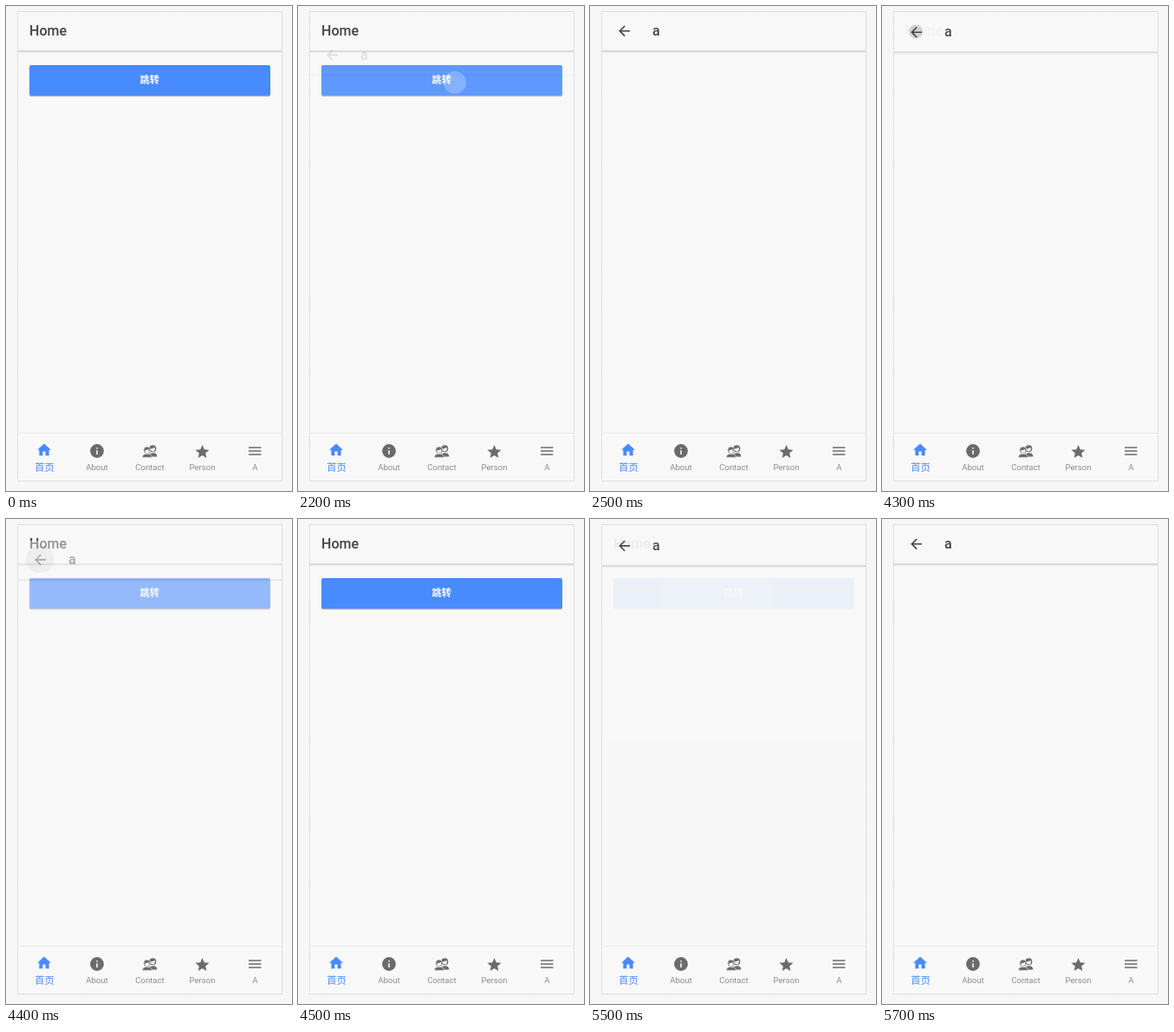
An HTML page that plays this animation: 330 by 558 pixels, repeating every 6500 ms.

```html
<!DOCTYPE html>
<html lang="en">
<head>
<meta charset="utf-8">
<title>Page transition</title>
<style>
  html, body { margin: 0; width: 100%; height: 100%; overflow: hidden; background: #f6f6f6; }
  svg { display: block; width: 330px; height: 558px; font-family: Roboto, "Noto Sans CJK SC", "Noto Sans CJK", sans-serif; }
  .title { font-size: 16px; font-weight: 500; fill: #424242; }
  .label { font-size: 9.6px; fill: #8c8c8c; text-anchor: middle; }
  .active { font-size: 11.2px; font-weight: 500; fill: #488aff; text-anchor: middle; }
  .caption { font-size: 11.2px; font-weight: 700; fill: #fff; text-anchor: middle; }
  .icon { fill: #6b6b6b; }
  .paper { fill: #f8f8f8; }
</style>
</head>
<body>
<svg viewBox="0 0 330 558">
  <defs>
    <clipPath id="screen"><rect x="14" y="7" width="304" height="484"/></clipPath>
    <clipPath id="buttonArea"><rect x="27" y="68" width="278" height="35" rx="2"/></clipPath>
    <g id="bar">
      <rect class="paper" x="14" y="7" width="304" height="485"/>
      <rect x="14" y="51" width="304" height="2" fill="#d9d9d9"/>
      <rect x="14" y="53" width="304" height="1" fill="#efefef"/>
    </g>
  </defs>

  <rect width="330" height="558" fill="#f6f6f6"/>
  <rect class="paper" x="13.5" y="6.5" width="305" height="540"/>

  <g clip-path="url(#screen)">
    <g id="home">
      <use href="#bar"/>
      <text class="title" x="27" y="34">Home</text>
      <g id="button">
        <rect x="27" y="69.5" width="278" height="35" rx="2" fill="#000" opacity=".14"/>
        <rect x="27" y="69" width="278" height="35" rx="2" fill="#000" opacity=".18"/>
        <rect x="27" y="68" width="278" height="35" rx="2" fill="#488aff"/>
        <text class="caption" x="165.7" y="88.6">跳转</text>
        <g clip-path="url(#buttonArea)"><circle id="tap" cy="88" fill="#fff"/></g>
      </g>
    </g>
    <g id="detail">
      <use href="#bar"/>
      <circle id="backTap" cx="39" cy="28" fill="#424242"/>
      <path transform="translate(30 19.2) scale(.8)" fill="#424242"
        d="M20 11H7.83l5.59-5.59L12 4l-8 8 8 8 1.41-1.41L7.83 13H20z"/>
      <text class="title" x="72" y="34">a</text>
    </g>
  </g>

  <!-- tab bar -->
  <rect x="14" y="491" width="304" height="1" fill="#e8e8e8"/>
  <path transform="translate(34.4 501.2) scale(.8)" fill="#488aff" d="M10 20v-6h4v6h5v-8h3L12 3 2 12h3v8z"/>
  <text class="active" x="44.5" y="535">首页</text>

  <circle class="icon" cx="105" cy="512" r="7.9"/>
  <path class="paper" d="M104.2 508h1.6v1.6h-1.6zM104.2 511.2h1.6v4.8h-1.6z"/>
  <text class="label" x="105" y="534.3">About</text>

  <g class="icon">
    <path d="M164.5 518.5c0-3 2-3.8 4-4.2h2c2 .3 3.8 1.2 3.8 4.2z"/>
    <circle cx="169.3" cy="509.2" r="4"/>
    <path class="paper" d="M166.8 509.2c2 .2 3.6-.3 4.6-1.4l.5 1.4c0 4.4-5 4.4-5.1 0z"/>
    <path stroke="#f8f8f8" stroke-width=".6" d="M157.4 519.4c0-3 2-3.8 4-4.2h3c2 .3 4 1.2 4 4.2z"/>
    <circle cx="162.8" cy="511" r="4" stroke="#f8f8f8" stroke-width=".6"/>
    <path class="paper" d="M160.2 511.2c2 .2 3.6-.3 4.6-1.4l.6 1.4c0 4.4-5.1 4.4-5.2 0z"/>
  </g>
  <text class="label" x="166" y="534.3">Contact</text>

  <path class="icon" transform="translate(216.9 503.3) scale(.8)"
    d="M12 17.27L18.18 21l-1.64-7.03L22 9.24l-7.19-.61L12 2 9.19 8.63 2 9.24l5.46 4.73L5.82 21z"/>
  <text class="label" x="226.5" y="534.3">Person</text>

  <path class="icon" transform="translate(277.6 502.4) scale(.8)" d="M3 6h18v2H3zM3 11h18v2H3zM3 16h18v2H3z"/>
  <text class="label" x="287.4" y="534.3">A</text>

  <rect x="13.5" y="6.5" width="305" height="540" fill="none" stroke="#d2d2d2" stroke-dasharray="2 1"/>
</svg>
<script>
  const LOOP = 6500, STEP = 100, TRAVEL = 32;
  const $ = id => document.getElementById(id);

  // lead: how far into the transition its first visible step lies
  const moves = [
    { at: 2200, lead: 19, span: 280, open: true, x: 181, r: 13, alpha: .24 },
    { at: 4300, lead: 40, span: 200, open: false, r: 8, alpha: .2 },
    { at: 5400, lead: 35, span: 280, open: true, x: 147, r: 20.5, alpha: .2 }
  ];

  const curve = (a, b, s) => 3 * (1 - s) ** 2 * s * a + 3 * (1 - s) * s * s * b + s ** 3;

  function bezier(x1, y1, x2, y2) {
    return x => {
      let low = 0, high = 1;
      for (let i = 0; i < 30; i++) {
        const mid = (low + high) / 2;
        if (curve(x1, x2, mid) < x) low = mid; else high = mid;
      }
      return curve(y1, y2, low);
    };
  }

  const enter = bezier(.36, .66, .04, 1);
  const leave = bezier(.47, 0, .745, .715);

  function ripple(node, r, alpha) {
    node.setAttribute("r", r);
    node.setAttribute("opacity", Math.max(0, alpha));
  }

  function draw(time) {
    const t = Math.floor(time / STEP) * STEP;
    const move = moves.filter(m => m.at <= t).pop();
    let shown = 0, tapped = false, backTapped = false, age = 0;
    if (move) {
      age = t - move.at;
      const x = Math.min(1, (age + move.lead) / move.span);
      shown = move.open ? enter(x) : 1 - leave(x);
      if (x === 1) shown = move.open ? 1 : 0;
      tapped = move.open && x < 1;
      backTapped = !move.open && x < 1;
    }
    const detail = $("detail");
    detail.setAttribute("opacity", shown);
    detail.setAttribute("transform", `translate(0 ${TRAVEL * (1 - shown)})`);
    $("button").setAttribute("visibility", shown > .94 ? "hidden" : "visible");

    if (tapped) $("tap").setAttribute("cx", move.x);
    ripple($("tap"), tapped ? move.r + age * .45 : 0, tapped ? move.alpha - age * .0008 : 0);
    ripple($("backTap"), backTapped ? move.r + age * .08 : 0, backTapped ? move.alpha - age * .0008 : 0);
  }

  const start = performance.now();
  function tick() {
    draw((performance.now() - start) % LOOP);
    requestAnimationFrame(tick);
  }
  tick();
</script>
</body>
</html>
```
